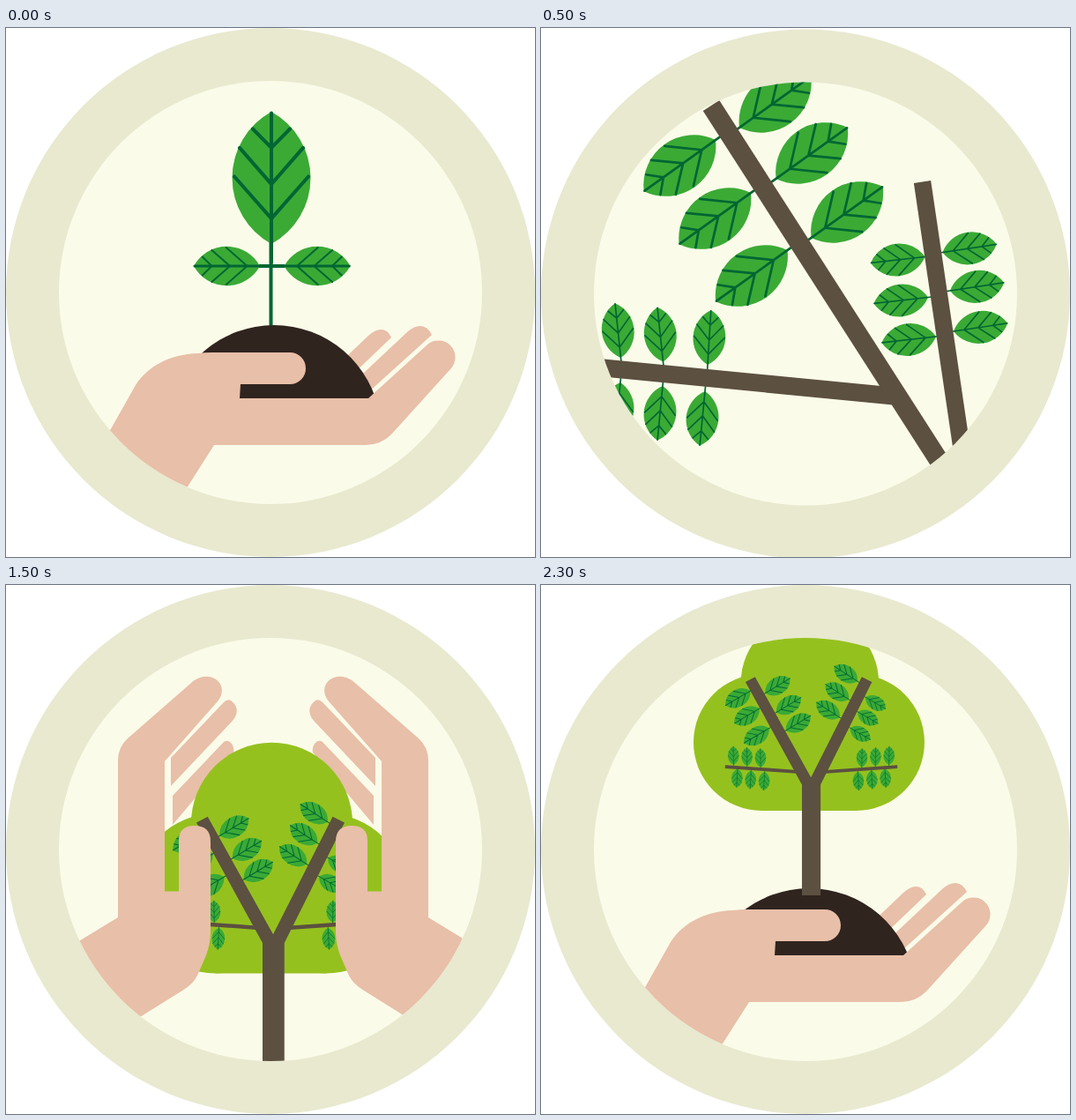
An HTML page that plays this animation: 600x600 px, repeating every 2.5 s.

```html
<!DOCTYPE html>
<html lang="en">
<head>
<meta charset="utf-8">
<title>From seedling to tree</title>
<style>
html, body { margin: 0; width: 100%; height: 100%; overflow: hidden; background: #fff; }
svg { display: block; width: 100%; height: 100%; }
.scene { visibility: hidden; animation: show 2.5s step-end infinite; }
.s2 { animation-delay: .5s; }
.s3 { animation-delay: 1s; }
.s4 { animation-delay: 1.5s; }
.s5 { animation-delay: 2s; }
@keyframes show {
  0% { visibility: visible; }
  20%, 100% { visibility: hidden; }
}
.skin { fill: #e8bfa8; }
.soil { fill: #30241f; }
.crown { fill: #95c11f; }
.wood { fill: #5c5040; }
.bark { fill: none; stroke: #5c5040; }
.vein { fill: none; stroke: #063; stroke-width: 2.7; stroke-linecap: round; stroke-linejoin: round; }
.stem { stroke: #063; stroke-width: 4; }
</style>
</head>
<body>
<svg viewBox="0 0 600 600">
<defs>
  <clipPath id="inside"><circle cx="300" cy="300" r="240"/></clipPath>

  <g id="disc">
    <circle cx="300" cy="300" r="300" fill="#e8e9cf"/>
    <circle cx="300" cy="300" r="240" fill="#fbfbe9"/>
  </g>

  <!-- Leaf along +x: base at 0, tip at 100 -->
  <g id="leaf">
    <path d="M0 0A57 57 0 0 1 100 0A57 57 0 0 1 0 0Z" fill="#3aaa35"/>
    <path class="vein" d="M-14 0H99M51 -28L19.3 0L51 28M72.7 -24L45.3 0L72.7 24M87 -14L72.7 0L87 14"/>
  </g>

  <!-- Close-up leaves -->
  <g id="bigL"><use href="#leaf" transform="rotate(144.4)"/></g>
  <g id="bigR"><use href="#leaf" transform="rotate(-35.6)"/></g>
  <g id="sideL"><use href="#leaf" transform="rotate(173.5) scale(.62)"/></g>
  <g id="sideR"><use href="#leaf" transform="rotate(-8.5) scale(.62)"/></g>
  <g id="up"><use href="#leaf" transform="rotate(-96) scale(.62)"/></g>
  <g id="down"><use href="#leaf" transform="rotate(95.5) scale(.62)"/></g>

  <!-- Tree leaves -->
  <g id="treeL"><use href="#leaf" transform="rotate(149.5) scale(.52)"/></g>
  <g id="treeR"><use href="#leaf" transform="rotate(-31) scale(.515)"/></g>
  <g id="backL"><use href="#leaf" transform="rotate(-147) scale(.495)"/></g>
  <g id="backR"><use href="#leaf" transform="rotate(30) scale(.415)"/></g>
  <g id="tinyUp"><use href="#leaf" transform="rotate(-91) scale(.33)"/></g>
  <g id="tinyDown"><use href="#leaf" transform="rotate(93) scale(.33)"/></g>

  <g id="twig">
    <use href="#tinyUp" x="166" y="343"/>
    <use href="#tinyUp" x="190" y="345"/>
    <use href="#tinyUp" x="214" y="347"/>
    <use href="#tinyDown" x="173" y="350"/>
    <use href="#tinyDown" x="197" y="352.5"/>
    <use href="#tinyDown" x="221" y="355"/>
    <path class="bark" stroke-width="6" d="M151 346L278 355"/>
  </g>

  <g id="tree">
    <g class="crown">
      <circle cx="301" cy="197" r="122"/>
      <circle cx="216" cy="303" r="121"/>
      <circle cx="383" cy="303" r="121"/>
      <path d="M216 190H383V424H216Z"/>
    </g>
    <use href="#twig"/>
    <use href="#twig" transform="translate(607) scale(-1 1)"/>
    <use href="#treeL" x="196" y="211.5"/>
    <use href="#treeL" x="212" y="243"/>
    <use href="#treeL" x="229" y="278"/>
    <use href="#treeR" x="222" y="216"/>
    <use href="#treeR" x="241.5" y="250"/>
    <use href="#treeR" x="258.5" y="282"/>
    <use href="#backL" x="385.5" y="195"/>
    <use href="#backL" x="370" y="227"/>
    <use href="#backL" x="354" y="259"/>
    <use href="#backR" x="399.5" y="223"/>
    <use href="#backR" x="386" y="249"/>
    <use href="#backR" x="372.5" y="277.5"/>
    <path class="wood" d="M287 574V378L187 196L204 187L303 365L393 187L411 196L320 378V574Z"/>
  </g>

  <path id="mound" class="soil" d="M184 440A121.4 121.4 0 0 1 424 440Z"/>

  <g id="backFingers" class="skin">
    <path d="M370 388L411 349Q419 342 425 342Q433 342 437 351L390 396Z"/>
    <path d="M390 406L456 344Q463 338 470 338Q478 338 483 348L410 414Z"/>
  </g>
  <path id="palm" class="skin" d="M90 506L147 405C160 385 184 370 218 369Q225 368 234 368H322A18 18 0 0 1 322 404H266L265 420H411L477 360A19 19 0 0 1 504 387L437 461Q425 473 408 473H236L196 536Z"/>

  <g id="guardFingers" class="skin">
    <path d="M187 196L247 133Q251 129 255 131Q264 138 261 147Q260 151 256 155L187 228Z"/>
    <path d="M189 239L247 178Q251 175 255 179Q259 183 258 190L189 272Z"/>
  </g>
  <path id="guardPalm" class="skin" d="M40 430L127 377V199Q127 184 138 174L213 108.500C222 102 233 102 240 108.500C247 115 246 125 240 132L180 200V347.500H196V290Q196 273 214 273Q232 273 232 291V394Q232 406 227 420L217 443Q212 453 200 460L120 510Z"/>
</defs>

<g class="scene s1">
  <use href="#disc"/>
  <g clip-path="url(#inside)">
    <path class="stem" d="M300.500 240V340M287 270H316"/>
    <use href="#leaf" transform="translate(301 245) rotate(-90) scale(1.5)"/>
    <use href="#leaf" transform="translate(288 270) rotate(180) scale(.75)"/>
    <use href="#leaf" transform="translate(315.500 270) scale(.75)"/>
    <path class="stem" stroke-linecap="round" style="stroke-width:3" d="M214 270H389"/>
    <use href="#backFingers"/>
    <use href="#mound"/>
    <use href="#palm"/>
  </g>
</g>

<g class="scene s2" transform="translate(0 1.5)">
  <use href="#disc"/>
  <g clip-path="url(#inside)">
    <g transform="translate(0 -1.5)">
      <use href="#bigL" x="198" y="127"/>
      <use href="#bigL" x="238" y="187"/>
      <use href="#bigL" x="279.5" y="252"/>
      <use href="#bigR" x="225" y="113"/>
      <use href="#bigR" x="266.5" y="171"/>
      <use href="#bigR" x="306.500" y="238"/>
      <use href="#up" x="90.500" y="374"/>
      <use href="#up" x="138.500" y="378.500"/>
      <use href="#up" transform="rotate(9.500 189 382)" x="189" y="382"/>
      <use href="#down" x="90" y="402"/>
      <use href="#down" x="138" y="406"/>
      <use href="#down" x="186" y="412"/>
      <use href="#sideL" x="435.500" y="259.500"/>
      <use href="#sideL" x="439" y="305.500"/>
      <use href="#sideL" x="448" y="350"/>
      <use href="#sideR" x="455.500" y="254.500"/>
      <use href="#sideR" x="464" y="298"/>
      <use href="#sideR" x="468" y="344"/>
      <path class="bark" stroke-width="20" d="M60 384.500L400 417.500"/>
      <path class="bark" stroke-width="22" d="M193 88L476 529"/>
      <path class="bark" stroke-width="19.500" d="M432.500 174.500L481 503"/>
    </g>
  </g>
</g>

<g class="scene s3">
  <use href="#disc"/>
  <g clip-path="url(#inside)"><use href="#tree"/></g>
</g>

<g class="scene s4">
  <use href="#disc"/>
  <g clip-path="url(#inside)">
    <use href="#guardFingers"/>
    <use href="#guardFingers" transform="translate(606) scale(-1 1)"/>
    <use href="#tree" transform="translate(75.75 122.500) scale(.75)"/>
    <use href="#guardPalm"/>
    <use href="#guardPalm" transform="translate(606) scale(-1 1)"/>
  </g>
</g>

<g class="scene s5">
  <use href="#disc"/>
  <g clip-path="url(#inside)">
    <use href="#backFingers" y="3" style="display:none"/>
    <use href="#backFingers"/>
    <use href="#mound" y="7"/>
    <use href="#tree" transform="translate(112.100 -15.600) scale(.6406)"/>
    <use href="#palm"/>
  </g>
</g>
</svg>
</body>
</html>
```
